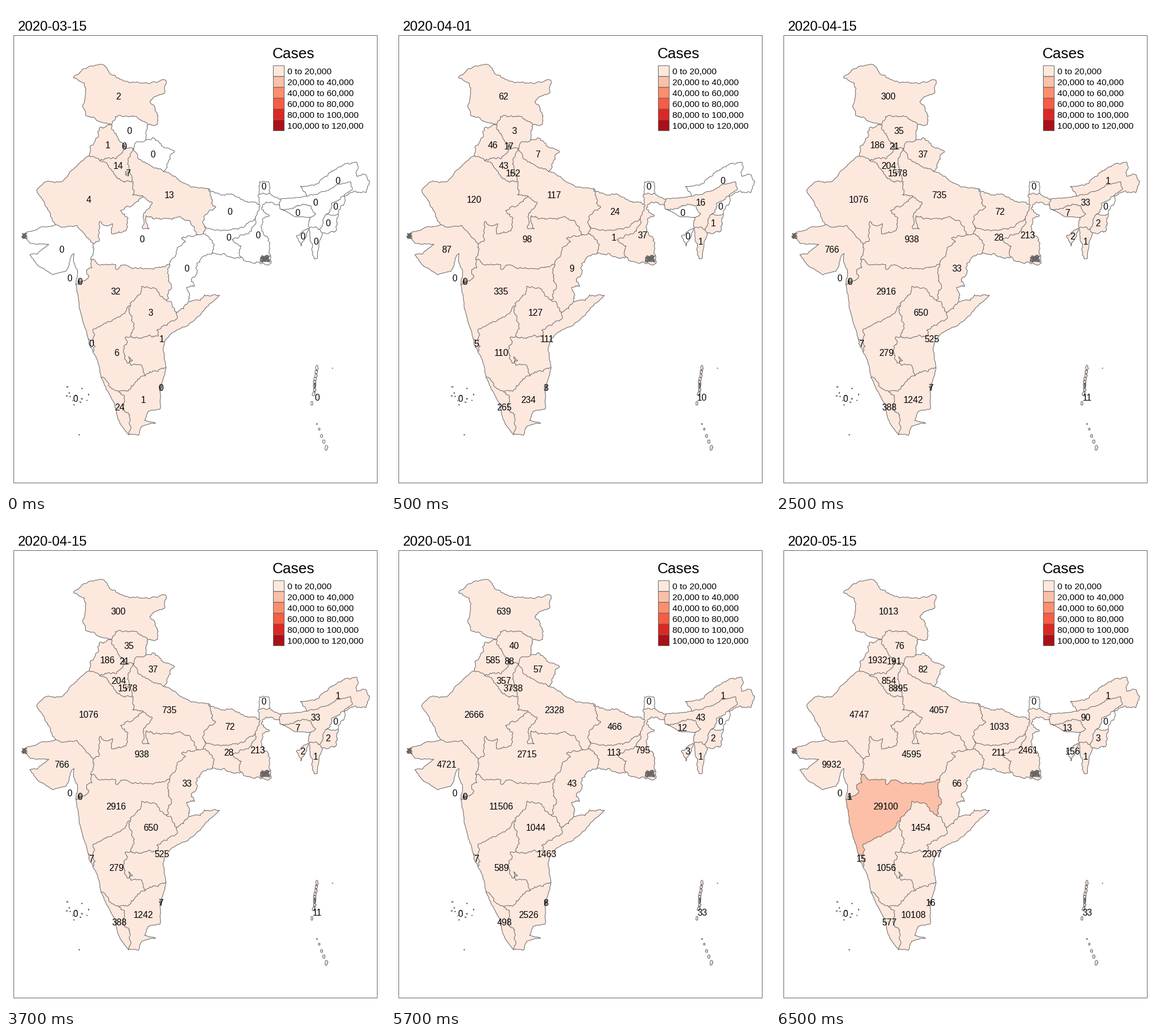
Recreate the animation shown at these times as a matplotlib script. Size 660 by 849 pixels, loop 8000 ms.

```python
import math
import random

import matplotlib.pyplot as plt
from matplotlib.animation import FuncAnimation

W, H, DPI = 660, 849, 100
PX = 72 / DPI
GREY = "#666666"
REDS = ["#FDE8DE", "#FCBFA8", "#FC8E6E", "#F65D43", "#DB2824", "#AB1016"]
DATES = ["2020-03-15", "2020-04-01", "2020-04-15", "2020-05-01", "2020-05-15"]
SMOOTH, JAGGED = 0.2, 0.65

plt.rcParams["font.family"] = "Liberation Sans"
fig = plt.figure(figsize=(W / DPI, H / DPI), dpi=DPI, facecolor="white")
ax = fig.add_axes([0, 0, 1, 1])
ax.set(xlim=(-0.5, W - 0.5), ylim=(H - 0.5, -0.5))
ax.axis("off")

arcs = {}
regions = []


def write(x, y, text, size, ha="left"):
    return ax.text(x, y, text, size=size * PX, ha=ha, va="baseline", zorder=4)


def box(x, y, w, h, color="none"):
    ax.add_patch(plt.Rectangle((x, y), w, h, fc=color, ec=GREY, lw=PX, snap=False))


def stroke(points, width=1.0):
    ax.plot(*zip(*points), color=GREY, lw=width * PX, zorder=3,
            solid_joinstyle="round")


def split(p, q, rough, rng):
    """Fractal line from p to q, without p: shift midpoints until pieces are short."""
    length = math.dist(p, q)
    if length < 3.2:
        return [q]
    shift = rng.uniform(-rough, rough) / math.sqrt(length)
    mid = ((p[0] + q[0]) / 2 - shift * (q[1] - p[1]),
           (p[1] + q[1]) / 2 + shift * (q[0] - p[0]))
    return split(p, mid, rough, rng) + split(mid, q, rough, rng)


def arc(name, *keys, rough=JAGGED):
    """Border through a few key points, shared by the regions on both sides."""
    rng = random.Random(name)
    points = [keys[0]]
    for p, q in zip(keys, keys[1:]):
        points += split(p, q, rough, rng)
    arcs[name] = points
    stroke(points)


def island(name, x, y, rx, ry):
    rng = random.Random(name)
    keys = []
    for k in range(8):
        r, a = rng.uniform(0.7, 1.2), k * math.pi / 4
        keys.append((x + r * rx * math.cos(a), y + r * ry * math.sin(a)))
    arc(name, *keys, keys[0])


def scribble(x, y, w, h, count):
    """Tangle of creeks or enclaves around a centre."""
    rng = random.Random(count)
    stroke([(x + rng.uniform(-w, w), y + rng.uniform(-h, h)) for _ in range(count)], 0.9)


def ring(names):
    """Join arcs end to end, turning each one as needed."""
    parts = [arcs[n] for n in names.split()]
    path = parts[0]
    if len(parts) > 1 and path[-1] not in (parts[1][0], parts[1][-1]):
        path = path[::-1]
    for part in parts[1:]:
        path = path + (part if part[0] == path[-1] else part[::-1])
    return path


def region(x, y, borders="", counts=(0,) * 5):
    fills = [ax.fill(*zip(*ring(r)), lw=0, zorder=1)[0]
             for r in borders.split("|") if r]
    regions.append((write(x, y + 5, "", 15.6, "center"), fills, counts))


# North
arc("jk_out", (183, 206), (166, 202), (139, 191), (137, 182), (133, 173), (138, 150),
    (136, 134), (117, 124), (148, 104), (169, 102), (180, 117), (217, 133), (240, 134),
    (278, 129), (275, 152), (250, 166), (263, 187), (263, 206), (246, 206), rough=0.5)
arc("jk_hp", (183, 206), (190, 192), (216, 192), (246, 206))
arc("hp_e", (246, 206), (243, 220), (243, 233))
arc("hp_uk", (243, 233), (225, 238), (222, 248))
arc("hp_hr", (222, 248), (207, 247))
arc("hp_pb", (183, 206), (196, 233), (207, 247))
arc("pb_w", (183, 206), (163, 211), (160, 228), (146, 244), (145, 261))
arc("pb_rj", (145, 261), (162, 268))
arc("pb_hr", (162, 268), (191, 266), (207, 247))
arc("hr_rj", (162, 268), (178, 278), (188, 293), (206, 307), (219, 305))
arc("hr_up", (222, 248), (211, 275), (219, 305), rough=0.4)
arc("uk_e", (243, 233), (256, 229), (293, 254), (274, 288))
arc("uk_up", (274, 288), (247, 275), (232, 267), (222, 248))
arc("up_n", (274, 288), (300, 303), (320, 314), (352, 318), rough=0.4)
arc("up_br", (352, 318), (357, 343), (365, 350), (345, 365), (345, 383))
arc("up_jh", (345, 383), (343, 396))
arc("up_cg", (343, 396), (334, 398))
arc("up_mp", (238, 331), (253, 341), (238, 366), (238, 388), (249, 388), (244, 365),
    (270, 371), (317, 373), (334, 398))
arc("up_rj", (219, 305), (220, 329), (238, 331))

# West and centre
arc("rj_w", (145, 261), (131, 270), (98, 305), (68, 306), (53, 321), (72, 352), (86, 381),
    rough=0.4)
arc("rj_gj", (86, 381), (123, 382), (152, 414), rough=0.5)
arc("rj_mp", (152, 414), (161, 410), (163, 375), (170, 382), (185, 379), (183, 396),
    (209, 390), (212, 370), (199, 356), (238, 331))
arc("gj_mp", (152, 414), (152, 428), (147, 441))
arc("gj_coast", (86, 381), (66, 384), (29, 397), (41, 413), (74, 415), (54, 432), (41, 433),
    (60, 455), (82, 468), (104, 462), (113, 436), (118, 431), (117, 443), (124, 460),
    (121, 484), rough=0.3)
arc("gj_mh", (147, 441), (149, 456), (140, 462), (144, 471), (121, 484))
arc("mh_mp", (147, 441), (160, 450), (190, 450), (192, 459), (200, 451), (245, 457),
    (270, 455), (284, 449))
arc("mh_cg", (284, 449), (282, 479), (288, 490), (279, 513))
arc("mh_tg", (216, 522), (234, 500), (236, 488), (258, 491), (279, 513))
arc("mh_ka", (152, 583), (151, 563), (188, 545), (216, 522))
arc("mh_coast", (121, 484), (126, 513), (133, 548), (143, 580), rough=SMOOTH)
arc("mp_cg", (334, 398), (305, 404), (312, 411), (288, 441), (284, 449))
arc("cg_jh", (343, 396), (361, 418), (358, 431))
arc("cg_e", (358, 431), (343, 436), (330, 456), (332, 466), (322, 480), (328, 488),
    (314, 490), (318, 515))
arc("cg_tg", (279, 513), (288, 517), (296, 535))

# South
arc("ap_cg", (318, 515), (296, 535))
arc("ap_n", (371, 504), (345, 503), (338, 513), (318, 515))
arc("ap_tg", (296, 535), (297, 545), (262, 565), (265, 573), (217, 575))
arc("ap_coast", (371, 504), (341, 533), (316, 557), (296, 565), (277, 582), (273, 596),
    (278, 630), rough=0.3)
arc("ka_tg", (217, 575), (220, 550), (216, 522))
arc("ka_ap", (217, 575), (207, 577), (211, 585), (204, 600), (213, 622), (220, 617),
    (213, 611), (217, 626), (236, 626), (242, 644))
arc("mh_ga", (143, 580), (152, 583))
arc("ga_coast", (143, 580), (151, 602))
arc("ga_ka", (151, 602), (155, 593), (152, 583))
arc("ka_coast", (151, 602), (162, 628), (165, 647), rough=SMOOTH)
arc("ka_kl", (165, 647), (178, 661), (196, 672))
arc("ka_tn", (196, 672), (212, 671), (226, 654), (242, 644))
arc("ap_tn", (242, 644), (250, 637), (278, 630))
arc("kl_coast", (165, 647), (187, 690), (196, 722), (213, 747), rough=SMOOTH)
arc("kl_tn", (196, 672), (205, 678), (205, 704), (215, 712), (213, 747))
arc("tn_coast", (278, 630), (268, 663), (268, 702), (247, 706), (241, 722), (260, 727),
    (236, 732), (230, 748), (213, 747), rough=0.3)

# East
arc("br_n", (352, 318), (368, 326), (388, 328), (416, 340), (440, 345))
arc("br_wb", (440, 345), (437, 359), (434, 370))
arc("br_jh", (434, 370), (403, 389), (366, 390), (345, 383))
arc("jh_wb", (434, 370), (427, 392), (393, 407), (409, 418), (409, 437))
arc("jh_s", (358, 431), (380, 431), (394, 438), (409, 437))
arc("wb_s", (409, 437), (426, 446), (461, 448))
arc("wb_e", (461, 448), (455, 402), (445, 389), (446, 371), (458, 364), (444, 353),
    (453, 341), (476, 346))
arc("wb_nw", (440, 328), (440, 345))
arc("sk_n", (440, 328), (441, 306), (457, 306), (459, 326), rough=0.4)
arc("sk_wb", (440, 328), (459, 326))
arc("wb_n", (459, 326), (478, 336))
arc("wb_as", (476, 346), (478, 336))
arc("as_n", (478, 336), (500, 334), (523, 331), rough=SMOOTH)
arc("as_ar", (523, 331), (555, 323), (575, 311), (600, 306), (603, 319), (588, 331), rough=0.4)
arc("ar_out", (523, 331), (512, 314), (545, 308), (560, 295), (583, 280), (611, 273),
    (610, 296), (627, 294), (633, 305), (626, 325), (606, 322), (588, 331))
arc("as_nl", (588, 331), (566, 345), (557, 363))
arc("nl_e", (588, 331), (589, 341), (578, 362))
arc("nl_mn", (578, 362), (557, 363))
arc("as_mn", (557, 363), (545, 389))
arc("mn_e", (578, 362), (573, 393), (551, 395))
arc("mn_mz", (551, 395), (545, 389))
arc("as_mz", (545, 389), (528, 386))
arc("mz_out", (551, 395), (542, 439), (536, 440), (528, 386), rough=0.4)
arc("as_s", (528, 386), (530, 368))
arc("tr", (526, 387), (513, 418), (505, 401), (526, 387))
arc("ml_n", (478, 354), (505, 348), (531, 350), (539, 362), (530, 368))
arc("ml_s", (530, 368), (505, 367), (478, 354), rough=SMOOTH)
arc("as_w", (478, 354), (476, 346))

# Island chains, deltas and enclaves
rng = random.Random(4)
for k in range(8):
    island(f"an{k}", 541.5 - 0.9 * k + rng.uniform(-1, 1), 631 + 6.3 * k, 2.1, 4.6)
for k in range(5):
    island(f"an{8 + k}", 541 + 4 * k, 727 + 11 * k + rng.uniform(-2, 2), 1.3 + 0.3 * k, 1 + k)
island("an13", 532, 692, 2, 4)
island("an14", 568, 631, 0.5, 0.5)
for k in range(12):
    island(f"ld{k}", rng.uniform(101, 150), rng.uniform(655, 695),
           rng.uniform(0.4, 1.3), rng.uniform(0.4, 1.3))
island("ld12", 127, 747, 0.7, 0.7)
scribble(31.5, 400, 5, 5, 36)
scribble(451, 440, 9, 7, 60)
scribble(205.5, 244, 2.5, 4, 12)
scribble(127.5, 480, 3.5, 5, 11)
scribble(211, 291, 4, 5, 8)
scribble(268, 665, 3, 4, 15)
scribble(538, 660, 2, 6, 14)

region(195.5, 157, "jk_out jk_hp", (2, 62, 300, 639, 1013))
region(214, 217, "jk_hp hp_e hp_uk hp_hr hp_pb", (0, 3, 35, 40, 76))
region(176.5, 242, "hp_pb pb_hr pb_rj pb_w", (1, 46, 186, 585, 1932))
region(205, 244.5, counts=(0, 17, 21, 88, 191))
region(195.5, 278.5, "pb_hr hp_hr hr_up hr_rj", (14, 43, 204, 357, 854))
region(212, 291.5, counts=(7, 152, 1578, 3738, 8895))
region(255.5, 258, "hp_uk uk_e uk_up", (0, 7, 37, 57, 82))
region(144, 337, "pb_rj hr_rj up_rj rj_mp rj_gj rj_w", (4, 120, 1076, 2666, 4747))
region(284, 329.5, "hr_up uk_up up_n up_br up_jh up_cg up_mp up_rj", (13, 117, 735, 2328, 4057))
region(389, 358, "br_n br_wb br_jh up_br", (0, 24, 72, 466, 1033))
region(387.5, 403, "br_jh jh_wb jh_s cg_jh up_jh", (0, 1, 28, 113, 211))
region(438, 399.5, "br_wb jh_wb wb_s wb_e wb_as wb_n sk_wb wb_nw", (0, 37, 213, 795, 2461))
region(448.5, 315, "sk_n sk_wb")
region(577.5, 305, "ar_out as_ar", (0, 0, 1, 1, 1))
region(538.5, 342.5, "as_n as_ar as_nl as_mn as_mz as_s ml_n as_w wb_as", (0, 16, 33, 43, 90))
region(573, 349, "as_nl nl_mn nl_e")
region(507, 360.5, "ml_n ml_s", (0, 0, 7, 12, 13))
region(560.5, 378.5, "nl_mn as_mn mn_mz mn_e", (0, 1, 2, 2, 3))
region(516.5, 401, "tr", (0, 0, 2, 3, 156))
region(539, 410.5, "as_mz mz_out mn_mz", (0, 1, 1, 1, 1))
region(236, 406, "rj_mp up_mp mp_cg mh_mp gj_mp", (0, 98, 938, 2715, 4595))
region(96.5, 424.5, "rj_gj gj_mp gj_mh gj_coast", (0, 87, 766, 4721, 9932))
region(110, 474)
region(128, 480.5, counts=(0, 0, 0, 0, 1))
region(314.5, 457, "mp_cg up_cg cg_jh cg_e ap_cg cg_tg mh_cg", (0, 9, 33, 43, 66))
region(191, 497.5, "gj_mh mh_mp mh_cg mh_tg mh_ka mh_ga mh_coast", (32, 335, 2916, 11506, 29100))
region(251.5, 534, "mh_tg cg_tg ap_tg ka_tg", (3, 127, 650, 1044, 1454))
region(271, 580.5, "ap_n ap_cg ap_tg ka_ap ap_tn ap_coast", (1, 111, 525, 1463, 2307))
region(148, 589, "mh_ga ga_ka ga_coast", (0, 5, 7, 7, 15))
region(192, 604, "mh_ka ka_tg ka_ap ka_tn ka_kl ka_coast ga_ka", (6, 110, 279, 589, 1056))
region(197, 699.5, "ka_kl kl_tn kl_coast", (24, 265, 388, 498, 577))
region(239, 687, "ka_tn ap_tn tn_coast kl_tn", (1, 234, 1242, 2526, 10108))
region(269, 665.5, counts=(0, 3, 7, 8, 16))
region(120.5, 685)
region(541.5, 682.5, "|".join(n for n in arcs if n.startswith("an")), (0, 10, 11, 33, 33))

# Frame, title and legend
box(13, 51, 633, 780)
title = write(20, 42, "", 23.6)
write(463, 90, "Cases", 26)
for i, color in enumerate(REDS):
    y = 103.5 + 18.9 * i
    box(465, y, 19, 18.9, color)
    write(489.5, y + 15, f"{i * 20000:,} to {(i + 1) * 20000:,}", 15.35)


def update(frame):
    step = (frame + 3) // 4
    title.set_text(DATES[step])
    for label, fills, counts in regions:
        n = counts[step]
        label.set_text(str(n))
        for patch in fills:
            patch.set_facecolor(REDS[n // 20000] if n else "white")
    return []


anim = FuncAnimation(fig, update, frames=16, interval=500, repeat=True)
plt.show()
```
